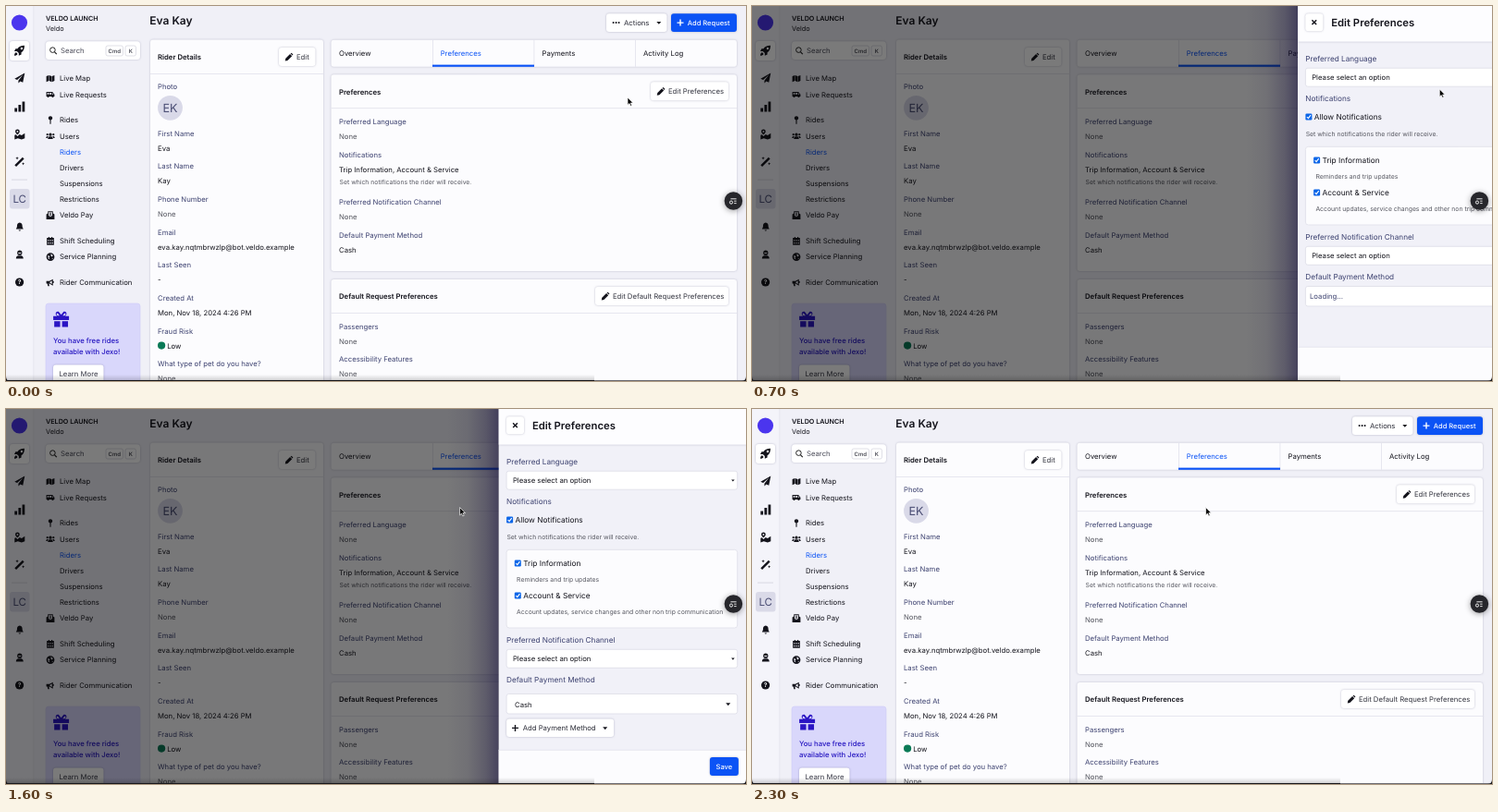
Recreate the animation shown at these times as an HTML page. Size 800 px wide and 406 px high, loop 2.4 s.

```html
<!DOCTYPE html>
<html lang="en">
<head>
<meta charset="utf-8">
<title>Rider preferences</title>
<style>
html, body { margin: 0; width: 100%; height: 100%; overflow: hidden; background: #f0f0f7; }
svg { display: block; width: 800px; height: 406px; }
text { font-family: Inter, Roboto, "Liberation Sans", sans-serif; text-rendering: geometricPrecision; white-space: pre; }
.card { filter: drop-shadow(0 .7px 1.3px rgba(45, 45, 90, .26)); }
.btn { filter: drop-shadow(0 .8px 1.1px rgba(45, 45, 90, .3)); }
.btn.hover { filter: drop-shadow(0 .2px .3px rgba(45, 45, 90, .2)); }
.bubble { filter: drop-shadow(0 1px 3px rgba(0, 0, 0, .4)); }
</style>
</head>
<body>
<svg id="stage" viewBox="0 0 800 406" xmlns="http://www.w3.org/2000/svg"></svg>
<script>
const INK = '#14141c', LABEL = '#3d4270', MUTED = '#55565f', BLUE = '#0b53f5', LINE = '#e2e2ec', CARD = '#fcfcfe';
const BASE = 7.72;

// Icons live in a box from -8 to 8.
const ICONS = {
  rocket: 'M8-8C2-8-1-6-3-3H-6L-8 1H-4L-1 4V8L3 6V3C6 1 8-2 8-8ZM5.2-3.4a1.7 1.7 0 1 1-3.4 0a1.7 1.7 0 1 1 3.4 0ZM-5 3C-7 3-8 6-8 8C-6 8-3 7-3 5Z',
  plane: 'M8-8L-8 1L-4 3L5-5L-2 4V8L1 5L5 7Z',
  bars: 'M-8 2h4v6h-4ZM-2-3h4v11h-4ZM4-8h4v16h-4Z',
  route: 'M-3.5-8a3.5 3.5 0 0 1 3.5 3.5c0 2-3.5 5-3.5 5s-3.5-3-3.5-5a3.5 3.5 0 0 1 3.5-3.5ZM-2.2-4.5a1.3 1.3 0 1 0-2.6 0a1.3 1.3 0 1 0 2.6 0ZM-8 1L-6 .3L-3.5 2.8L0 0L3 1.4L8-2V6L3 8L-3 6L-8 8Z',
  wand: 'M-8 5.5L4.5-7L7-4.5L-5.5 8ZM-4-8l.8 1.7 1.7.8-1.7.8-.8 1.7-.8-1.7-1.7-.8 1.7-.8ZM5.5 1l.7 1.5 1.5.7-1.5.7-.7 1.5-.7-1.5-1.5-.7 1.5-.7Z',
  bell: 'M0-8C-4-7-5-5-5-2C-5 2-7 3-7 4.5H7C7 3 5 2 5-2C5-5 4-7 0-8ZM-2 6H2C2 8.7-2 8.7-2 6Z',
  agent: 'M0-8a4.7 4.7 0 1 1 0 9.4a4.7 4.7 0 1 1 0-9.4ZM-2.6-3.6H2.6V-2H-2.6ZM-7 8C-7 3-4 2.4 0 2.4S7 3 7 8Z',
  map: 'M-8-4L-3-6V5L-8 7ZM-2.3-6L2.3-4V7L-2.3 5ZM3-4L8-6V5L3 7Z',
  bus: 'M-8-5H4L8 0V4H6.5a2 2 0 0 1-4 0H-2.5a2 2 0 0 1-4 0H-8ZM-6-3V0H-3V-3ZM-1.5-3V0H2V-3ZM3.5-3V0H6Z',
  pin: 'M0-8a4 4 0 0 1 1 7.9V7L0 8L-1 7V-.1A4 4 0 0 1 0-8Z',
  users: 'M0-6a3 3 0 1 1 0 6a3 3 0 1 1 0-6ZM-5 6C-5 2-3 1 0 1S5 2 5 6ZM-6-5a2 2 0 1 1 0 4a2 2 0 1 1 0-4ZM6-5a2 2 0 1 1 0 4a2 2 0 1 1 0-4ZM-8.5 4C-8.5 1-7 0-4 .5L-6 4ZM8.5 4C8.5 1 7 0 4 .5L6 4Z',
  pay: 'M-8-2L-5-4V-8H5V-4L8-2V8H-8ZM-3.4-6V.5L0 3L3.4 .5V-6ZM-1-5H1V1H-1Z',
  calendar: 'M-7-6H-4V-8H-2V-6H2V-8H4V-6H7V8H-7ZM-5-2V0H-3V-2ZM-1-2V0H1V-2ZM3-2V0H5V-2ZM-5 3V5H-3V3ZM-1 3V5H1V3ZM3 3V5H5V3Z',
  globe: 'M0-8a8 8 0 1 1 0 16a8 8 0 1 1 0-16ZM-5-3L-1-1L-3 2L-1 5L-4 4ZM1-6L5-3L3 0L1-2ZM3 3L5 2L4 5Z',
  horn: 'M-8-3H-2L5-7V-3a2 2 0 0 1 0 4V6L-2 2H-3L-2 7H-5L-6 2H-8ZM3-3.5L-1-1.5V.5L3 2.5Z',
  gift: 'M-8-3H-4C-7-5-5-8.5-2.5-7.5L0-4.5L2.5-7.5C5-8.5 7-5 4-3H8V1H-8ZM-3.6-6.2L-1.6-3.6H-3.4C-5-4-5-6-3.6-6.2ZM3.6-6.2L1.6-3.6H3.4C5-4 5-6 3.6-6.2ZM-7 2H-1V8H-7ZM1 2H7V8H1Z',
  pencil: 'M-8 8L-7 3L2-6L6-2L-3 7ZM3-7L5-8.3L8.3-5L7-3Z',
  plus: 'M-1.4-7H1.4V-1.4H7V1.4H1.4V7H-1.4V1.4H-7V-1.4H-1.4Z',
  cross: 'M-7-4.5L-4.5-7L0-2.5L4.5-7L7-4.5L2.5 0L7 4.5L4.5 7L0 2.5L-4.5 7L-7 4.5L-2.5 0Z',
  caret: 'M-8-4H8L0 5Z',
  dots: 'M-6-2a2 2 0 1 1 0 4a2 2 0 1 1 0-4ZM0-2a2 2 0 1 1 0 4a2 2 0 1 1 0-4ZM6-2a2 2 0 1 1 0 4a2 2 0 1 1 0-4Z'
};

// Text is placed by the middle of its capitals.
const text = (x, y, s, color = INK, weight = 400, size = BASE, anchor = 'start') =>
  `<text x="${x}" y="${(y + size * .364).toFixed(2)}" fill="${color}" font-weight="${weight}" font-size="${size}" text-anchor="${anchor}">${s}</text>`;
const note = (x, y, s) => text(x, y, s, MUTED, 400, 6.85);
const rect = (x, y, w, h, fill, r = 0, extra = '') =>
  `<rect x="${x}" y="${y}" width="${w}" height="${h}" rx="${r}" fill="${fill}" ${extra}/>`;
const circle = (x, y, r, fill, extra = '') => `<circle cx="${x}" cy="${y}" r="${r}" fill="${fill}" ${extra}/>`;
const icon = (name, x, y, size, color = INK) =>
  `<path d="${ICONS[name]}" fill="${color}" fill-rule="evenodd" transform="translate(${x} ${y}) scale(${size / 16})"/>`;
const card = (x, y, w, h) => rect(x, y, w, h, CARD, 3, 'class="card"');
const button = (x, y, w, h, id = '') => rect(x, y, w, h, '#fff', 3, `class="btn" ${id && `id="${id}"`}`);
const editButton = (x, y, w, label, id) =>
  button(x, y, w, 20, id) + icon('pencil', x + 11, y + 10.2, 8.5) + text(x + 18.9, y + 10, label, '#33343f');
const field = (x, y, label, value) =>
  text(x, y, label, LABEL) + text(x, y + 16, value, value === 'None' ? MUTED : INK);
const fields = (x, rows) => rows.map(([y, label, value]) => field(x, y, label, value)).join('');

function rail() {
  const marks = [['plane', 78], ['bars', 109], ['route', 139], ['wand', 168.5], ['bell', 239], ['agent', 269]];
  return rect(0, 0, 30, 406, '#f4f4fa') + rect(29.5, 0, .7, 406, '#e0e0ea') +
    circle(14.5, 18, 8.6, '#4b35ee') +
    button(4, 38, 21, 21) + icon('rocket', 14.5, 48.3, 11) +
    marks.map(([n, y]) => icon(n, 14.8, y, y > 200 ? 9 : 11)).join('') +
    rect(6, 187.6, 17, .9, '#d4d4df') +
    rect(4, 198, 21.5, 21.5, '#dadae8', 3) + text(14.7, 208.8, 'LC', '#4a4d74', 400, 11.5, 'middle') +
    circle(14.6, 299, 4.6, INK) + text(14.6, 299, '?', '#fff', 700, 6.6, 'middle');
}

function sidebar() {
  const items = [
    ['Live Map', 78.3, 'map'], ['Live Requests', 95.7, 'bus'], ['Rides', 123.6, 'pin'], ['Users', 140.8, 'users'],
    ['Riders', 158], ['Drivers', 175.2], ['Suspensions', 192.3], ['Restrictions', 209.5], ['Veldo Pay', 226.6, 'pay'],
    ['Shift Scheduling', 254.4, 'calendar'], ['Service Planning', 271.6, 'globe'], ['Rider Communication', 299.5, 'horn']
  ];
  const key = (x, w, s) => rect(x, 43, w, 11, '#fff', 2, 'stroke="#d3d3dd" stroke-width=".7"') +
    text(x + w / 2, 48.4, s, '#33343f', 500, 6, 'middle');
  return text(43, 13.3, 'VELDO LAUNCH', INK, 600, 7.2) + text(43, 24.6, 'Veldo', INK, 400, 7.3) +
    rect(43, 38.3, 102, 19.6, '#fff', 3.5, 'class="card"') +
    '<circle cx="50.4" cy="47.6" r="2.8" fill="none" stroke="#222" stroke-width="1"/><path d="M52.4 49.7L54.8 52.2" stroke="#222" stroke-width="1.2"/>' +
    text(59, 48.2, 'Search', '#4c4d5a') + key(108, 18.5, 'Cmd') + key(129, 11.5, 'K') +
    items.map(([s, y, n]) => text(58, y, s, s === 'Riders' ? BLUE : INK) + (n ? icon(n, 48, y, 8.8) : '')).join('') +
    rect(43, 322, 102, 90, '#d9d7fb', 3, 'stroke="#cfccf6" stroke-width=".6"') +
    icon('gift', 59.6, 339, 17, '#2a14c4') +
    text(51, 362.5, 'You have free rides', '#2414c0', 500) + text(51, 374.6, 'available with Jexo!', '#2414c0', 500) +
    button(51, 388.5, 54.5, 20) + text(57.5, 398.4, 'Learn More', '#3a3b48');
}

function riderCard() {
  return text(155.3, 15.5, 'Eva Kay', INK, 600, 12) + card(156, 36.5, 187, 380) +
    text(164, 55, 'Rider Details', INK, 600) + rect(156, 73, 187, .8, LINE) + editButton(295, 45, 39.5, 'Edit') +
    text(164, 87.5, 'Photo', LABEL) + circle(177.5, 110.3, 13.4, '#d9d9e8') +
    text(177.5, 110.6, 'EK', '#4a4d74', 400, 12.6, 'middle') +
    fields(164, [
      [138, 'First Name', 'Eva'], [173.6, 'Last Name', 'Kay'], [209.2, 'Phone Number', 'None'],
      [244.8, 'Email', 'eva.kay.nqtmbrwzlp@bot.veldo.example'], [280.5, 'Last Seen', '-'],
      [316, 'Created At', 'Mon, Nov 18, 2024 4:26 PM'], [387.3, 'What type of pet do you have?', 'None']
    ]) +
    text(164, 352, 'Fraud Risk', LABEL) + circle(168.1, 367.6, 4.1, '#0a7a56') + text(174.2, 367.8, 'Low');
}

function mainCards() {
  const tabs = [['Overview', 360, INK], ['Preferences', 469.7, BLUE], ['Payments', 579.5, INK], ['Activity Log', 689, INK]];
  return button(649, 8.3, 65.5, 19.6) + icon('dots', 659.6, 18, 8) + text(668, 18, 'Actions', '#2a2b36') + icon('caret', 705.8, 18.2, 5) +
    rect(719, 8.3, 71, 19.6, BLUE, 3, 'class="btn"') + icon('plus', 729, 18.1, 8, '#fff') + text(736.8, 18, 'Add Request', '#fff', 500, 7.5) +
    card(351.5, 36.8, 438.5, 29) +
    [461, 570.5, 680].map(x => rect(x, 36.8, .8, 29, LINE)).join('') +
    tabs.map(([s, x, color]) => text(x, 51.2, s, color)).join('') +
    rect(461, 63.6, 110, 2.2, BLUE) +
    card(351.5, 74.3, 438.5, 212.7) + text(360, 92.8, 'Preferences', INK, 600) +
    editButton(697, 82.3, 84, 'Edit Preferences', 'edit') + rect(351.5, 110.3, 438.5, .8, LINE) +
    card(351.5, 296, 438.5, 120) + text(360, 314.2, 'Default Request Preferences', INK, 600) +
    editButton(637, 304, 144, 'Edit Default Request Preferences') + rect(351.5, 332, 438.5, .8, LINE) +
    fields(360, [
      [125.4, 'Preferred Language', 'None'], [161, 'Notifications', 'Trip Information, Account &amp; Service'],
      [212.5, 'Preferred Notification Channel', 'None'], [248.3, 'Default Payment Method', 'Cash'],
      [346.8, 'Passengers', 'None'], [382.4, 'Accessibility Features', 'None']
    ]) +
    note(360.6, 190.8, 'Set which notifications the rider will receive.');
}

function drawer() {
  const label = (y, s) => text(8.3, y, s, LABEL, 400, 8.2);
  const box = (y, h) => rect(8.4, y, 249.6, h, '#fff', 2.5, 'stroke="#d9d9e4" stroke-width=".7"');
  const select = y => box(y - 10, 20) + text(15.2, y, 'Please select an option') + icon('caret', 253.2, y + .2, 3.6);
  const check = (x, y, s) => rect(x, y - 3.5, 7, 7, '#0c66e8', 1.2) +
    `<path d="M${x + 1.5} ${y}l1.5 1.7l2.6-3.5" fill="none" stroke="#fff" stroke-width="1.1"/>` +
    text(x + 9.4, y + .3, s, INK, 400, 8.3);
  return rect(-56, 0, 56, 406, 'url(#cast)') + rect(0, 0, 268, 406, '#f1f1f8') +
    rect(0, 0, 268, 38.6, '#fdfdff', 0, 'class="card"') +
    button(8.3, 8.2, 19, 19) + icon('cross', 17.8, 17.7, 6.6) + text(36.2, 17.9, 'Edit Preferences', INK, 600, 11.3) +
    label(57.4, 'Preferred Language') + select(77.2) +
    label(100.2, 'Notifications') + check(8.4, 120, 'Allow Notifications') +
    note(8.7, 138.6, 'Set which notifications the rider will receive.') +
    rect(8.4, 152.3, 249.6, 84.7, CARD, 3, 'stroke="#dcdce6" stroke-width=".7"') +
    check(17.1, 167, 'Trip Information') + note(19.4, 184.8, 'Reminders and trip updates') +
    check(17.1, 202, 'Account &amp; Service') + note(19.4, 219.7, 'Account updates, service changes and other non trip communication') +
    label(250.4, 'Preferred Notification Channel') + select(270.3) +
    label(293.4, 'Default Payment Method') +
    '<g id="loading">' + box(303.5, 21.5) + text(13, 314.2, 'Loading...', LABEL) + '</g>' +
    '<g id="loaded">' + box(308.5, 21.5) + text(17.3, 319.8, 'Cash') + icon('caret', 248, 319.6, 5) +
    button(8.4, 335.5, 116, 19.6) + icon('plus', 17.8, 345.4, 8) + text(26, 345.4, 'Add Payment Method', '#2a2b36') +
    icon('caret', 115, 345.6, 5) + '</g>' +
    rect(0, 369, 268, 37, CARD) + rect(0, 368.8, 268, .8, LINE) +
    rect(228.2, 376.9, 31, 20, BLUE, 3, 'class="btn"') + text(243.7, 386.9, 'Save', '#fff', 500, 7.5, 'middle');
}

function helpBubble() {
  return circle(786.4, 211, 9.8, '#26262b', 'class="bubble"') +
    '<g fill="none" stroke="#fff" stroke-width=".9"><circle cx="784" cy="212.6" r="1.6"/><path d="M783.4 208.8H789.6M787.2 211.2H789.6M787.2 213.6H789.6"/></g>';
}

const stops = list => list.map(([at, color, alpha]) =>
  `<stop offset="${at}" stop-color="${color}" stop-opacity="${alpha}"/>`).join('');
const defs = `<defs>
  <linearGradient id="cast">${stops([[0, '#140c40', 0], [.4, '#140c40', .07], [.75, '#140c40', .26], [1, '#140c40', .5]])}</linearGradient>
  <linearGradient id="sill" x2="0" y2="1">${stops([[0, '#000', 0], [1, '#000', .16]])}</linearGradient>
</defs>`;

const pointers = `<g id="cursor">
  <path id="arrow" d="M0 0V8.3L1.9 6.5L3.2 9.3L4.6 8.7L3.3 6H5.9Z" fill="#000" stroke="#fff" stroke-width=".7"/>
  <path id="hand" d="M-.9 .6C-.9-.6 .8-.6 .8 .6V3.3C1.4 2.8 2.3 3 2.4 3.7C3 3.3 3.9 3.5 4 4.2C4.6 4 5.2 4.3 5.2 5V7C5.2 8 4.5 8.6 4.4 9.6H-.2C-.7 8-2.6 6.6-2.9 5.4C-2.7 4.5-1.6 4.8-.9 5.7Z" fill="#fff" stroke="#111" stroke-width=".75"/>
</g>`;
const edge = rect(0, 399, 636, 6, 'url(#sill)') + rect(0, 405, 636, 1, '#17171b') + rect(636, 405, 164, 1, '#6d6d74') +
  '<path d="M0 401Q0 406 5 406H0ZM800 401Q800 406 795 406H800Z" fill="#17171b"/>';

document.getElementById('stage').innerHTML = defs +
  rect(0, 0, 800, 406, '#f0f0f7') + rail() + sidebar() + riderCard() + mainCards() +
  rect(0, 0, 800, 406, '#000', 0, 'id="shade" opacity="0"') +
  `<g id="drawer">${drawer()}</g>` + helpBubble() + edge + pointers;

const el = Object.fromEntries(['shade', 'drawer', 'loading', 'loaded', 'cursor', 'arrow', 'hand', 'edit']
  .map(id => [id, document.getElementById(id)]));
const show = (node, on) => node.setAttribute('visibility', on ? 'inherit' : 'hidden');

const LOOP = 2400, STEP = 100;
const OPEN = 532.7;
const slide = { 600: 757, 700: 590, 1700: 658 };
const path = [[0, 672, 99], [400, 743.3, 90], [900, 743.3, 90], [1500, 490.6, 106.6], [LOOP, 490.6, 106.6]];
const ease = p => p * p * (3 - 2 * p);

function pointerAt(t) {
  const i = path.findIndex(p => p[0] > t);
  const [t0, x0, y0] = path[i - 1], [t1, x1, y1] = path[i];
  const p = ease((t - t0) / (t1 - t0));
  return [x0 + (x1 - x0) * p, y0 + (y1 - y0) * p];
}

function draw(t) {
  const [x, y] = pointerAt(t);
  const hover = t < 600 && x > 697;
  el.drawer.setAttribute('transform', `translate(${slide[t] || OPEN} 0)`);
  show(el.drawer, t >= 600 && t < 1800);
  el.shade.setAttribute('opacity', t >= 600 && t < 1700 ? .52 : 0);
  show(el.loading, t < 800);
  show(el.loaded, t >= 800);
  el.cursor.setAttribute('transform', `translate(${x} ${y})`);
  show(el.arrow, !hover);
  show(el.hand, hover);
  el.edit.classList.toggle('hover', hover);
}

const start = performance.now();
function tick() {
  const t = (performance.now() - start) % LOOP;
  draw(Math.floor(t / STEP) * STEP);
  requestAnimationFrame(tick);
}
tick();
</script>
</body>
</html>
```
